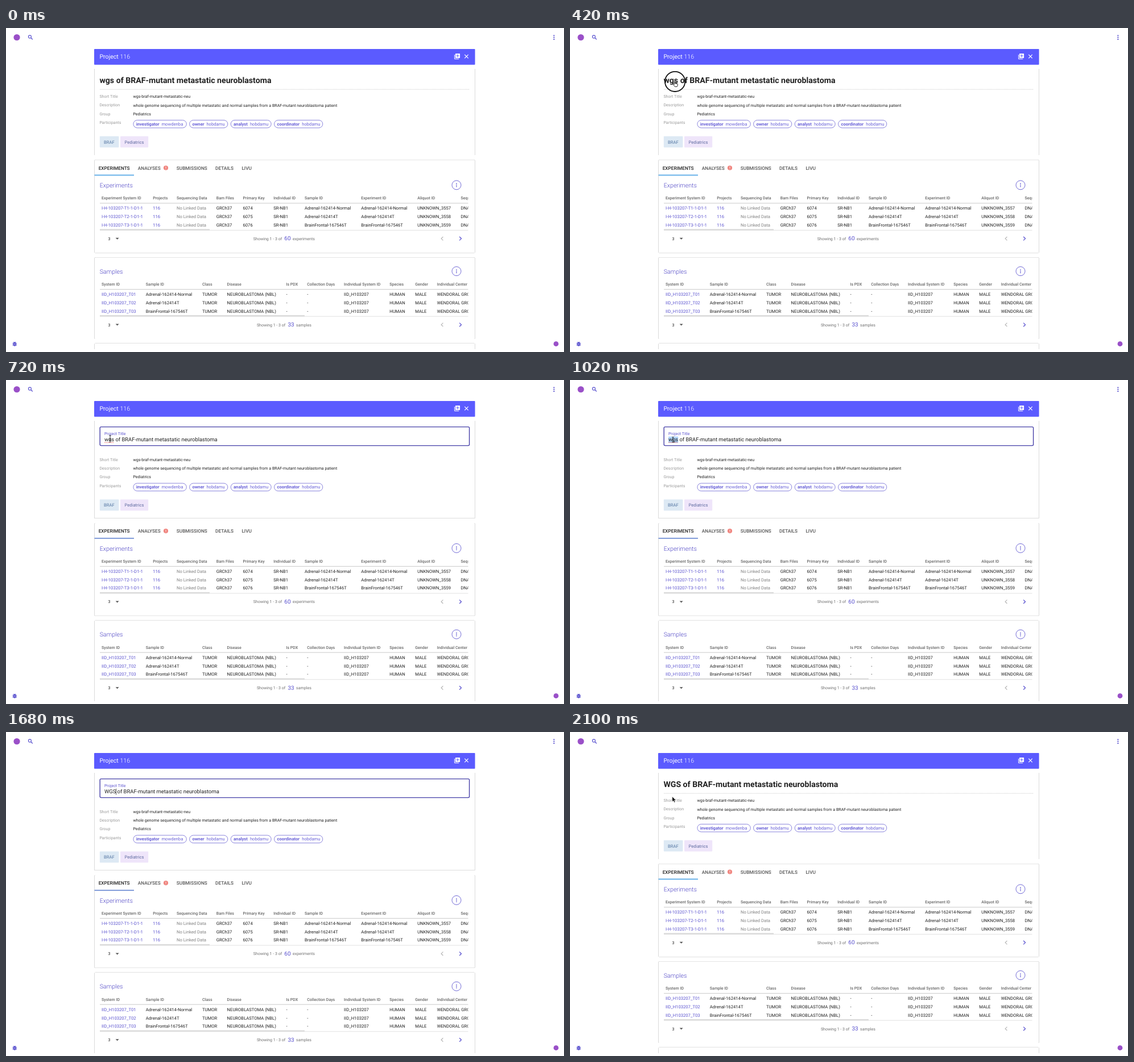
An HTML page that plays this animation: 981x571 px, repeating every 2.16 s.

```html
<!DOCTYPE html>
<html lang="en">
<head>
<meta charset="utf-8">
<title>Project 116</title>
<style>
html, body { margin: 0; width: 100%; height: 100%; overflow: hidden; background: #fff; }
svg { display: block; width: 981px; height: 571px; font-family: Roboto, "Liberation Sans", sans-serif; text-rendering: geometricPrecision; }
text { white-space: pre; fill: #212121; font-size: 7.66px; }
.s { font-size: 7.076px; }
.grey { fill: #9a9a9a; }
.mid { fill: #6f6f6f; }
.dim { fill: #808080; }
.head { font-size: 7.076px; font-weight: 500; fill: #666; }
.link { fill: #5a52cf; }
.role { fill: #6a62d8; }
.b { font-weight: 700; }
.gene { fill: #5577a3; }
.field { fill: #5f6ba0; }
.sect { font-size: 10.61px; font-weight: 300; fill: #4a40c4; }
.tab { font-size: 8.25px; font-weight: 500; fill: #555; }
.tab.on { fill: #222; }
.bar { font-size: 10.61px; fill: #fff; }
.thin { font-weight: 300; }
.count { font-size: 10px; fill: #5a52cf; }
.title { font-size: 14.15px; font-weight: 700; }
.input { font-size: 9.43px; }
.card { fill: #fff; filter: drop-shadow(0 .8px .5px #0006) drop-shadow(0 0 .6px #0003); }
.line { fill: none; stroke: #5a52cf; stroke-width: .85; }
.pill { fill: none; stroke: #7670d6; stroke-width: .85; }
</style>
</head>
<body>
<svg id="stage" viewBox="0 0 981 571"></svg>
<script>
const LOOP = 2160, STEP = 60, SHIFT = 19.6;
const REST = ' of BRAF-mutant metastatic neuroblastoma';
const INK = '#5a52cf', BAR = '#5b5bff';

const text = (x, y, s, cls = '', id = '') => `<text x="${x}" y="${y}" class="${cls}" ${id && `id="${id}"`}>${s}</text>`;
const rect = (x, y, w, h, fill, more = '') => `<rect x="${x}" y="${y}" width="${w}" height="${h}" fill="${fill}" ${more}/>`;
const card = (y, h) => `<rect class="card" x="155.5" y="${y}" width="669" height="${h}" rx="1.5"/>`;
const path = (d, stroke, w, more = '') => `<path d="${d}" fill="none" stroke="${stroke}" stroke-width="${w}" ${more}/>`;
const dot = (x, y, r, fill) => `<circle cx="${x}" cy="${y}" r="${r}" fill="${fill}"/>`;
const kebab = (x, y, gap, r) => [-gap, 0, gap].map(d => dot(x, y + d, r, INK)).join('');

function chip(x, w, role, user, ux) {
  return `<rect class="pill" x="${x}" y="162.4" width="${w}" height="13.6" rx="6.8"/>`
    + text(x + 4.8, 171.8, role, 'b role') + text(ux, 171.8, user, 'role');
}

function details() {
  const rows = [['Short Title', 'wgs-braf-mutant-metastatic-neu'],
    ['Description', 'whole genome sequencing of multiple metastatic and normal samples from a BRAF-mutant neuroblastoma patient'],
    ['Group', 'Pediatrics'], ['Participants', '']];
  return rows.map(([k, v], i) => text(164.4, 123.2 + i * 15.25, k, 's grey') + text(223.4, 123.3 + i * 15.3, v, 's')).join('')
    + chip(223.9, 93.4, 'investigator', 'mowdenba', 273.4)
    + chip(322.6, 67.2, 'owner', 'hobdamu', 352.4)
    + chip(395.2, 71, 'analyst', 'hobdamu', 428.9)
    + chip(471.6, 85.2, 'coordinator', 'hobdamu', 520.2)
    + rect(164.8, 190.8, 33.6, 19.8, '#dde9f4', 'rx="1"') + text(172, 203.6, 'BRAF', 'gene')
    + rect(201, 190.8, 49.2, 19.8, '#efe5fa', 'rx="1"') + text(208.4, 203.6, 'Pediatrics', 'field');
}

// cols: [x, heading, cell class, cell(s)]
function table(y, name, cols, thumb, total, unit, countX) {
  const cells = cols.map(([x, head, cls, vals]) => text(x, y + 25.2, head, 'head')
    + [0, 1, 2].map(i => text(x, y + 43.4 + i * 14.75, Array.isArray(vals) ? vals[i] : vals, cls)).join('')).join('');
  return text(164.8, y + 4, name, 'sect')
    + `<circle class="line" cx="792" cy="${y - .2}" r="8"/>` + kebab(792, y - .2, 2.6, .85)
    + `<g clip-path="url(#table)">${cells}</g>`
    + path(`M165 ${y + 31.8}H812.5`, '#bdbdbd', .8)
    + path(`M165 ${y + 79.4}H812.5`, '#d4d4d4', .7)
    + rect(165, y + 77.3, thumb, 2.2, '#dadada')
    + text(179.4, y + 96.8, '3', 's')
    + `<path d="M192.6 ${y + 92.8}h6l-3 3z" fill="#555"/>`
    + text(countX, y + 96.8, 'Showing 1 - 3 of', 's mid')
    + text(countX + 54.5, y + 97.3, total, 'count')
    + text(countX + 69.2, y + 96.8, unit, 's mid')
    + path(`M768.4 ${y + 90.8}l-3.2 3.3 3.2 3.3`, '#b0b0b0', 1.1)
    + path(`M797.2 ${y + 90.8}l3.3 3.3-3.3 3.3`, INK, 1.3);
}

function tabs() {
  const names = [[162.7, 'EXPERIMENTS'], [231.8, 'ANALYSES'], [299.8, 'SUBMISSIONS'], [368, 'DETAILS'], [414.4, 'LIVU']];
  return names.map(([x, s], i) => text(x, 249.6, s, i ? 'tab' : 'tab on')).join('')
    + dot(281, 246.5, 4.1, '#f08680') + path('M281 244.2v2.8M281 248v.9', '#fff', .8)
    + rect(155.5, 258.4, 69.5, 1.9, '#62aee8', 'id="under"');
}

const sampleIds = ['Adrenal-162414-Normal', 'Adrenal-162414T', 'BrainFrontal-167546T'];
const experiments = [
  [168, 'Experiment System ID', 'link', [1, 2, 3].map(n => `I-H-103207-T${n}-1-D1-1`)],
  [258.2, 'Projects', 'link', '116'],
  [300, 'Sequencing Data', 'dim', 'No Linked Data'],
  [369.7, 'Bam Files', '', 'GRCh37'],
  [416.5, 'Primary Key', '', ['6074', '6075', '6076']],
  [470.2, 'Individual ID', '', 'SR-NB1'],
  [525, 'Sample ID', '', sampleIds],
  [624.2, 'Experiment ID', '', sampleIds],
  [723.3, 'Aliquot ID', '', ['UNKNOWN_3557', 'UNKNOWN_3558', 'UNKNOWN_3559']],
  [799.4, 'Sequencing', '', 'DNA']];
const samples = [
  [168, 'System ID', 'link', [1, 2, 3].map(n => `IID_H103207_T0${n}`)],
  [245.8, 'Sample ID', '', sampleIds],
  [345, 'Class', '', 'TUMOR'],
  [388.6, 'Disease', '', 'NEUROBLASTOMA (NBL)'],
  [492.4, 'Is PDX', '', '-'],
  [529.2, 'Collection Days', '', '-'],
  [594, 'Individual System ID', '', 'IID_H103207'],
  [674.2, 'Species', '', 'HUMAN'],
  [719.2, 'Gender', '', 'MALE'],
  [757.7, 'Individual Center', '', 'WENDORAL GROVE']];

const chrome = dot(19, 16.5, 5.6, '#9a50c8') + dot(967, 556.7, 4.4, '#9a50c8')
  + `<circle cx="41.9" cy="15.4" r="2.5" fill="none" stroke="${INK}" stroke-width="1.1"/>` + path('M43.8 17.3l2.9 2.9', INK, 1.3)
  + kebab(963.4, 16.6, 3.3, 1.15)
  + rect(12.9, 553.6, 4.6, 7.2, INK, 'rx="2.3"')
  + path('M11.4 555.4h7.6M11.4 557.3h7.6M11.4 559.2h7.6M13.3 552.9l1.2 1.2M17.1 552.9l-1.2 1.2', INK, .9)
  + path('M14.4 556.5h1.6M14.4 558h1.6', '#fff', .6)
  + rect(155, 37, 669.6, 27.8, BAR, 'rx="1"')
  + text(164.4, 53.8, 'Project', 'bar') + text(200.4, 53.8, '116', 'bar thin')
  + path('M788.6 47v7.6h7.6', '#fff', 1)
  + rect(790, 44.9, 8.1, 8.1, '#fff', 'rx=".8"')
  + path('M794.05 46.4v5.1M791.5 48.95h5.1', BAR, 1)
  + path('M806.3 46.9l6.4 6.4M812.7 46.9l-6.4 6.4', '#fff', 1.2);

const pointers = `<g id="arrow"><path d="M0 0v9l2-1.8 1.5 3.3 1.5-.7-1.4-3.2h2.7z" fill="#000" stroke="#fff" stroke-width=".6"/></g>`
  + `<g id="hand"><path d="M-2-4.4c0-1.1 1.6-1.1 1.6 0v2.7l3.2.7c1 .2 1.3.7 1.2 1.6l-.5 2.3-.8 1.5h-3.7l-2.9-3.6c-.6-.9.3-1.6 1.1-1l.8.7z" fill="#fff" stroke="#000" stroke-width=".85"/>`
  + path('M-.3-.6v-1.2M1.2-.2v-1.2M2.6.1v-1', '#000', .6) + '</g>'
  + `<g id="beam">${path('M-1.6-4.6q1.6 0 1.6 1v7.2q0 1-1.6 1M1.6-4.6q-1.6 0-1.6 1M0 3.6q0 1 1.6 1M-1 1.2h2', '#111', .9)}</g>`
  + `<circle id="ring" cx="184.6" cy="94.4" r="17.6" fill="none" stroke="#111" stroke-width="1.8"/>`;

document.getElementById('stage').innerHTML = `<defs>
  <clipPath id="page"><rect width="981" height="566"/></clipPath>
  <clipPath id="table"><rect x="160" width="652.5" height="700"/></clipPath></defs>
  <g clip-path="url(#page)">
    <rect class="card" id="top" x="155.5" y="72" width="669" height="152"/>
    <g id="view">${text(164.4, 97.2, '', 'title', 'title')}${path('M165 108.2H815', '#c4c4c4', .8, 'stroke-dasharray="1.2 .8"')}</g>
    <g id="edit">
      ${rect(165.2, 82.6, 649.4, 33, '#fff', 'rx="2" stroke="#4640a8" stroke-width="1.4"')}
      <rect id="sel" x="173" y="99.7" width="17.2" height="11" fill="#b0d3fb"/>
      ${text(172.9, 96.8, 'Project Title', 's link')}${text(172.9, 108.4, '', 'input', 'input')}
      ${path('M173 110.2H190', '#e0433c', .9, 'stroke-dasharray="1.2 .9" id="wavy"')}
      <rect id="caret" y="99.7" width=".8" height="11" fill="#333"/>
    </g>
    <g id="body">${details()}
      ${card(232.3, 163.9)}${tabs()}
      ${table(277, 'Experiments', experiments, 193, '60', 'experiments', 434.8)}
      ${card(404.2, 143.8)}
      ${table(428.8, 'Samples', samples, 360, '33', 'samples', 440.9)}
      ${card(555.8, 80)}
    </g>
  </g>${chrome}${pointers}`;

const $ = id => document.getElementById(id);
const show = (id, on) => $(id).setAttribute('display', on ? 'inline' : 'none');
const place = (id, x, y) => $(id).setAttribute('transform', `translate(${x} ${y})`);
const between = (t, a, b) => t >= a && t < b;
const ramp = (t, a, b) => Math.min(1, Math.max(0, (t - a) / (b - a)));

function render(now) {
  const t = Math.floor(now % LOOP / STEP) * STEP;
  const editing = between(t, 480, 1740);
  const word = t < 1260 ? 'wgs' : t < 1320 ? 'W' : t < 1440 ? 'WG' : 'WGS';
  const selected = between(t, 900, 1260);

  show('view', !editing);
  show('edit', editing);
  $('title').textContent = $('input').textContent = word + REST;
  $('top').setAttribute('height', editing ? 152 + SHIFT : 152);
  place('body', 0, editing ? SHIFT : 0);
  $('under').setAttribute('fill', editing ? '#7d98d8' : '#62aee8');

  show('sel', selected);
  show('wavy', t < 1260);
  show('caret', between(t, 480, 600) || between(t, 1260, 1500) || between(t, 1680, 1740));
  if (editing) {
    const length = t < 1260 ? (word + REST).length : word.length;
    $('caret').setAttribute('x', 172.9 + $('input').getSubStringLength(0, length));
  }

  const near = ramp(t, 60, 300), down = ramp(t, 600, 840);
  show('arrow', between(t, 120, 240) || t >= 2100);
  if (t < 2100) place('arrow', 212 - 28 * near, 122 - 27 * near);
  else place('arrow', 179.8, 113.8);
  show('hand', between(t, 240, 660));
  place('hand', 212 - 26.6 * near, 122 - 23 * near);
  show('ring', t === 420);
  show('beam', between(t, 660, 1260));
  place('beam', 185 - 4 * down, 99 + 6 * down);
}

function tick() {
  render(performance.now());
  requestAnimationFrame(tick);
}
tick();
</script>
</body>
</html>
```
